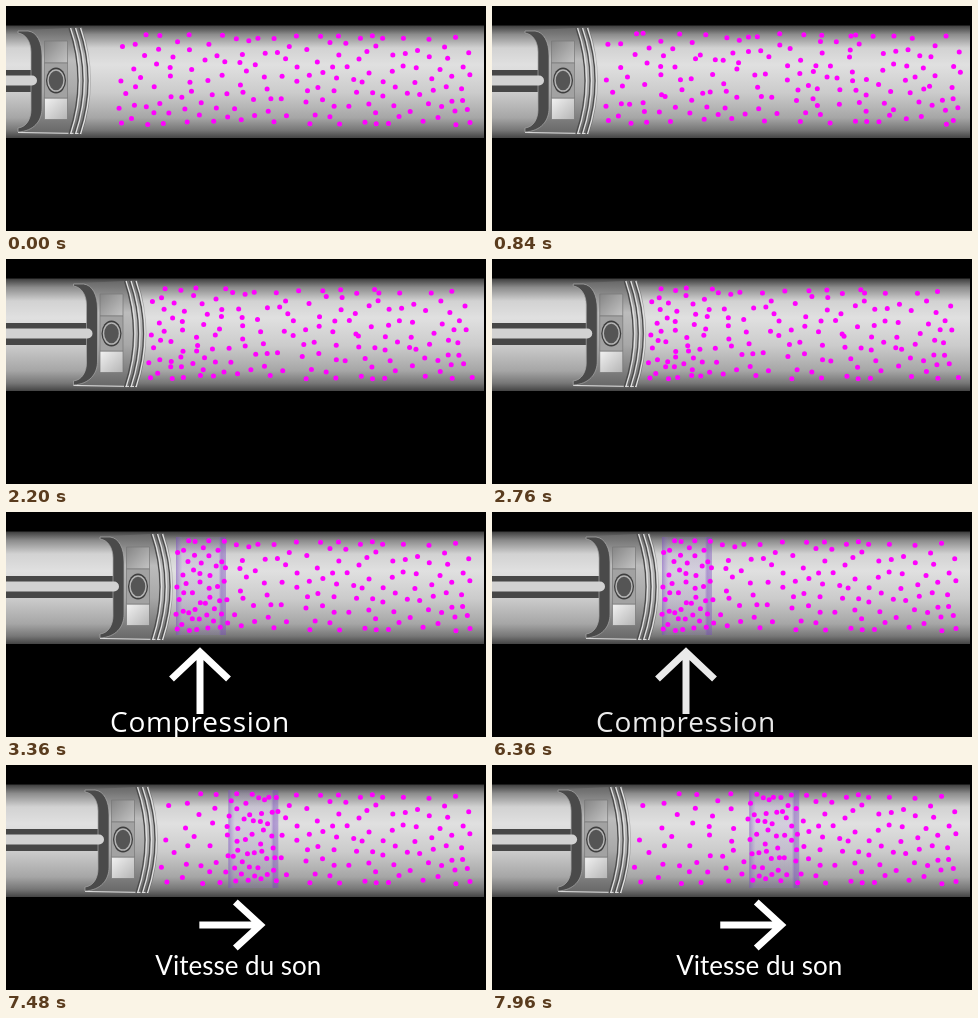
Recreate the animation shown at these times as an HTML page. Size 480x225 px, loop 8000 ms.

```html
<!DOCTYPE html>
<html lang="fr">
<head>
<meta charset="utf-8">
<title>Compression</title>
<style>
  html, body { margin: 0; width: 100%; height: 100%; overflow: hidden; background: #000; }
  svg { display: block; width: 480px; height: 225px; }
  text { fill: #fff; text-anchor: middle; }
  #press text { font: 28px "Open Sans", sans-serif; letter-spacing: .7px; }
  #sound text { font: 26px Lato, sans-serif; }
  .arrow { fill: none; stroke: #fff; stroke-width: 7; stroke-linejoin: miter; }
  .ring { fill: none; stroke: #4c4c4c; stroke-width: 1.3; }
  .shine { fill: none; stroke: #e2e2e2; stroke-width: 1.2; }
  #dots { fill: #f0f; }
</style>
</head>
<body>
<svg viewBox="0 0 480 225">
  <defs>
    <linearGradient id="tube" x2="0" y2="1">
      <stop offset="0" stop-color="#3c3c3c"/>
      <stop offset=".08" stop-color="#8c8c8c"/>
      <stop offset=".2" stop-color="#d2d2d2"/>
      <stop offset=".35" stop-color="#e0e0e0"/>
      <stop offset=".6" stop-color="#cbcbcb"/>
      <stop offset=".82" stop-color="#a6a6a6"/>
      <stop offset=".93" stop-color="#777"/>
      <stop offset="1" stop-color="#444"/>
    </linearGradient>
    <linearGradient id="metal" x2="0" y2="1">
      <stop offset="0" stop-color="#666"/>
      <stop offset=".3" stop-color="#bcbcbc"/>
      <stop offset=".6" stop-color="#a8a8a8"/>
      <stop offset="1" stop-color="#666"/>
    </linearGradient>
    <linearGradient id="boss" x2="1" y2="1">
      <stop offset="0" stop-color="#858585"/>
      <stop offset="1" stop-color="#c4c4c4"/>
    </linearGradient>
    <linearGradient id="foot" x2="1" y2="1">
      <stop offset="0" stop-color="#f2f2f2"/>
      <stop offset="1" stop-color="#b4b4b4"/>
    </linearGradient>
    <linearGradient id="haze">
      <stop offset="0" stop-color="#7a4cc0" stop-opacity=".55"/>
      <stop offset=".13" stop-color="#9a80d0" stop-opacity=".18"/>
      <stop offset=".85" stop-color="#9a80d0" stop-opacity=".18"/>
      <stop offset=".9" stop-color="#7a4cc0" stop-opacity=".5"/>
      <stop offset="1" stop-color="#7a4cc0" stop-opacity=".4"/>
    </linearGradient>
  </defs>

  <rect y="19.5" width="478" height="112.5" fill="url(#tube)"/>
  <rect id="band" y="25" width="50" height="98" fill="url(#haze)"/>

  <g id="piston">
    <path d="M20 24L76 21.5Q94 74 76 128L13 127Q34 120 34 104V46Q34 30 20 24Z" fill="url(#metal)"/>
    <path class="shine" d="M12 126.5L75 127.5"/>
    <g id="rings"></g>
    <path d="M-200 64H28V86H-200Z" fill="#474747"/>
    <path d="M12 25H22C31 26 36 36 36 50V102C36 115 28 125 12 126V122C21 121 25 112 25 104V46C25 36 20 28 12 27Z"
      fill="#4a4a4a" stroke="#aaa" stroke-width=".7"/>
    <path d="M-200 69.5H26A5 5 0 0 1 26 79.5H-200Z" fill="#d2d2d2"/>
    <g stroke="#777" stroke-width=".7">
      <path d="M38.5 35H61.5V57H38.5Z" fill="url(#boss)"/>
      <path d="M38.5 92H61.5V113.500H38.500Z" fill="url(#foot)"/>
      <path d="M38.5 57H61.5V92H38.5Z" fill="#a2a2a2"/>
    </g>
    <ellipse cx="50" cy="74.500" rx="10" ry="13" fill="#3e3e3e"/>
    <ellipse cx="50" cy="74.500" rx="8" ry="10.500" fill="#555" stroke="#b4b4b4" stroke-width="1.500"/>
  </g>

  <g id="dots"></g>

  <g id="press">
    <path class="arrow" d="M194 202V143M165.500 167L194 140L222.500 167"/>
    <text x="194" y="220">Compression</text>
  </g>
  <g id="sound">
    <path class="arrow" d="M141 160H201M177 137L202 160L177 183"/>
    <text x="180" y="210">Vitesse du son</text>
  </g>
</svg>
<script>
  const LOOP = 8000, STEP = 40;
  const HELD = 3360, RELEASE = 6760;
  const HOME = 113, FRONT = 220, BAND = 50;
  const NS = 'http://www.w3.org/2000/svg';
  const $ = id => document.getElementById(id);
  const clamp = v => Math.max(0, Math.min(1, v));
  const ramp = (t, from, to) => clamp((t - from) / (to - from));

  function add(parent, tag, attrs) {
    const el = document.createElementNS(NS, tag);
    for (const k in attrs) el.setAttribute(k, attrs[k]);
    return parent.appendChild(el);
  }

  // Piecewise linear track of [time, value] pairs
  function track(keys, t) {
    let i = 1;
    while (i < keys.length - 1 && t > keys[i][0]) i++;
    const [t0, v0] = keys[i - 1], [t1, v1] = keys[i];
    return v0 + (v1 - v0) * ramp(t, t0, t1);
  }

  const pistonKeys = [[0, 0], [840, 21], [2200, 55.5], [3280, 82], [RELEASE, 82], [7480, 67], [LOOP, 53]];

  for (const x of [63, 68, 73]) {
    const d = `M${x} 22Q${x + 18} 74 ${x} 128`;
    add($('rings'), 'path', { class: 'ring', d });
    add($('rings'), 'path', { class: 'shine', d, transform: 'translate(1.6)' });
  }

  let seed = 29;
  const rnd = () => (seed = (seed * 16807) % 2147483647) / 2147483647;

  // Evenly scattered gas: keep the roomiest of several random spots
  const dots = [];
  for (let n = 0; n < 158; n++) {
    let best, room = -1;
    for (let k = 0; k < 12; k++) {
      const x = HOME + 351 * rnd(), y = 28 + 91 * rnd();
      const gap = Math.min(999, ...dots.map(d => Math.hypot(d.x - x, d.y - y)));
      if (gap > room) { room = gap; best = { x, y }; }
    }
    const side = rnd() < .6 ? 1 : -.6;
    best.dx = 4.5 * side;
    best.dy = -1.5 + 2 * (rnd() - .5);
    best.el = add($('dots'), 'circle', { r: 2.5 });
    dots.push(best);
  }

  // Gas is squeezed against the face, then the dense band travels on
  function place(x, left, s) {
    if (x >= FRONT + s) return x;
    if (!s) return left + (x - HOME) * (FRONT - left) / (FRONT - HOME);
    const start = FRONT - BAND + s;
    if (x >= HOME + s) return start + BAND * (x - HOME - s) / (FRONT - HOME);
    return left + (start - left) * Math.pow((x - HOME) / s, .8);
  }

  function draw(t) {
    const p = track(pistonKeys, t);
    const s = Math.max(0, t - RELEASE) * .0727;
    const left = s ? 88 + p : Math.max(HOME, 88 + p);
    const sway = t < HELD ? Math.sin(2 * Math.PI * t / HELD)
      : .15 * Math.sin(Math.max(0, t - RELEASE) * Math.PI / 240);

    $('piston').setAttribute('transform', `translate(${p})`);
    for (const d of dots) {
      d.el.setAttribute('cx', place(d.x, left, s) + d.dx * sway * (d.x < 135 ? .2 : 1));
      d.el.setAttribute('cy', d.y + d.dy * sway);
    }

    const shown = ramp(t, 3000, HELD);
    $('band').setAttribute('x', 170 + s);
    $('band').setAttribute('opacity', shown);
    $('press').setAttribute('opacity', shown * (1 - ramp(t, 6320, 6800)));
    $('sound').setAttribute('transform', `translate(${s})`);
    $('sound').setAttribute('opacity', ramp(t, RELEASE, RELEASE + 500));
  }

  const begin = performance.now();
  function tick(now) {
    const t = Math.max(0, now - begin) % LOOP;
    draw(Math.floor(t / STEP) * STEP);
    requestAnimationFrame(tick);
  }
  draw(0);
  requestAnimationFrame(tick);
</script>
</body>
</html>
```
